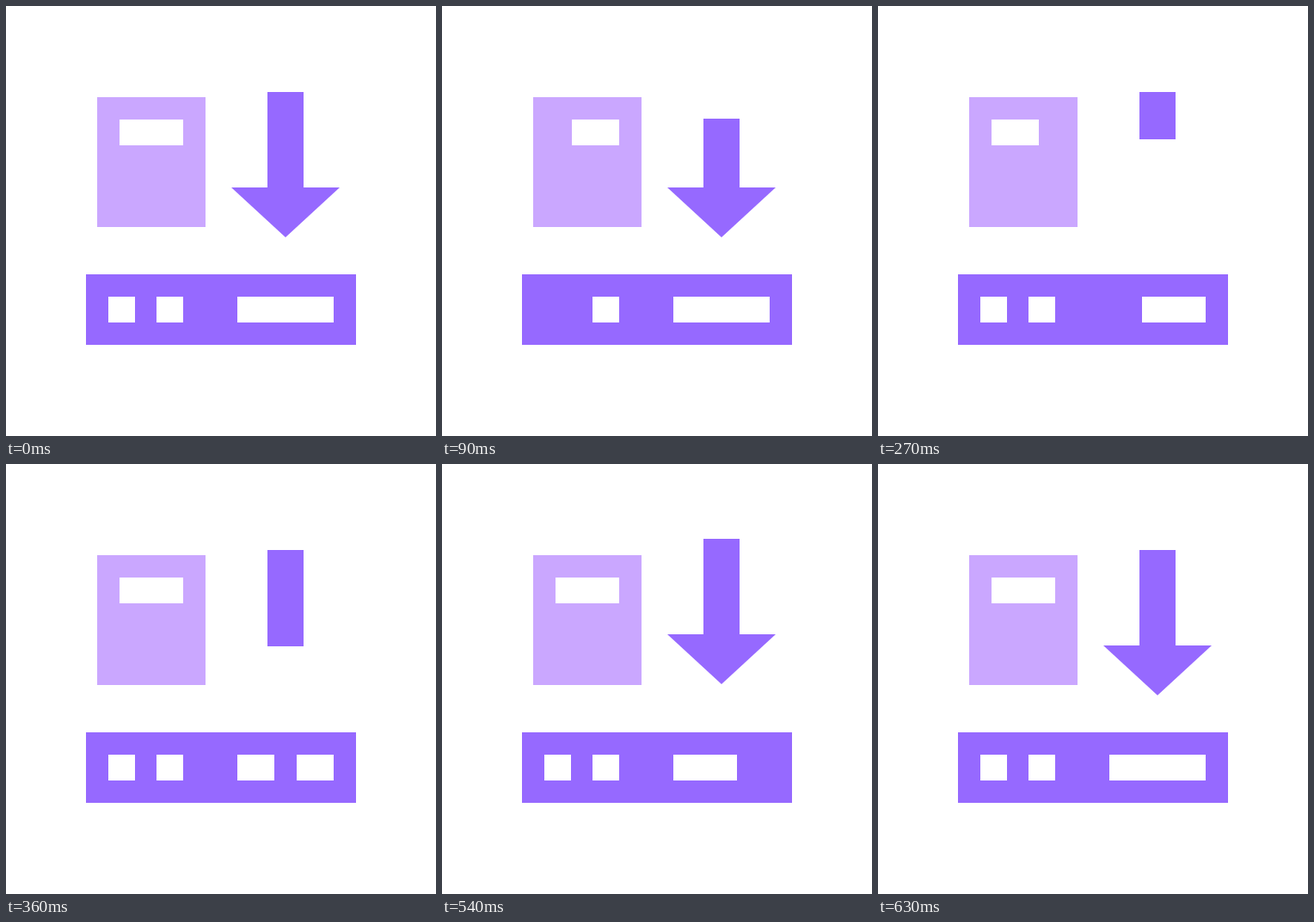
Write an HTML page with a canvas that moves like this. It is 500 by 500 pixels and loops after 0.72 s.

```html
<!DOCTYPE html>
<html lang="en">
<head>
<meta charset="utf-8">
<title>Download to drive</title>
<style>
html, body { margin: 0; width: 100%; height: 100%; overflow: hidden; background: #fff; }
canvas { display: block; width: 100vmin; height: 100vmin; }
</style>
</head>
<body>
<canvas id="stage" width="500" height="500"></canvas>
<script>
const ctx = document.getElementById('stage').getContext('2d');
const STEP = 90;
const WHITE = '#fff', LIGHT = '#caa7ff', PURPLE = '#9669ff';

// One entry per step; spans are [left, right] of white slots.
const label = [[132, 206]], slot = [[269, 381]];
const rest = { label, lights: [119, 175], slot, top: 100, bottom: 211, head: true, dy: 0 };
const poses = [
  {},
  { label: [[151, 206]], lights: [175], top: 131 },
  { label: [[132, 156], [182, 206]], lights: [119], top: 162 },
  { label: [[132, 187]], slot: [[307, 381]], bottom: 155, head: false },
  { slot: [[269, 312], [338, 381]], bottom: 212, head: false },
  { slot: [[269, 318]], dy: 6 },
  { slot: [[269, 343]], dy: -13 },
  {}
].map(p => ({ ...rest, ...p }));

function box(color, left, top, right, bottom) {
  ctx.fillStyle = color;
  ctx.fillRect(left, top, right - left, bottom - top);
}

function drawArrow({ top, bottom, head, dy }) {
  box(PURPLE, 304, top + dy, 346, bottom + dy);
  if (!head) return;
  ctx.beginPath();
  ctx.moveTo(262, 211 + dy);
  ctx.lineTo(388, 211 + dy);
  ctx.lineTo(325, 269 + dy);
  ctx.fill();
}

function draw(pose) {
  box(WHITE, 0, 0, 500, 500);
  box(LIGHT, 106, 106, 232, 257);
  box(PURPLE, 93, 312, 407, 394);
  pose.label.forEach(([l, r]) => box(WHITE, l, 132, r, 162));
  pose.lights.forEach(x => box(WHITE, x, 338, x + 31, 368));
  pose.slot.forEach(([l, r]) => box(WHITE, l, 338, r, 368));
  drawArrow(pose);
}

function tick() {
  draw(poses[Math.floor(performance.now() / STEP) % poses.length]);
  requestAnimationFrame(tick);
}
tick();
</script>
</body>
</html>
```
